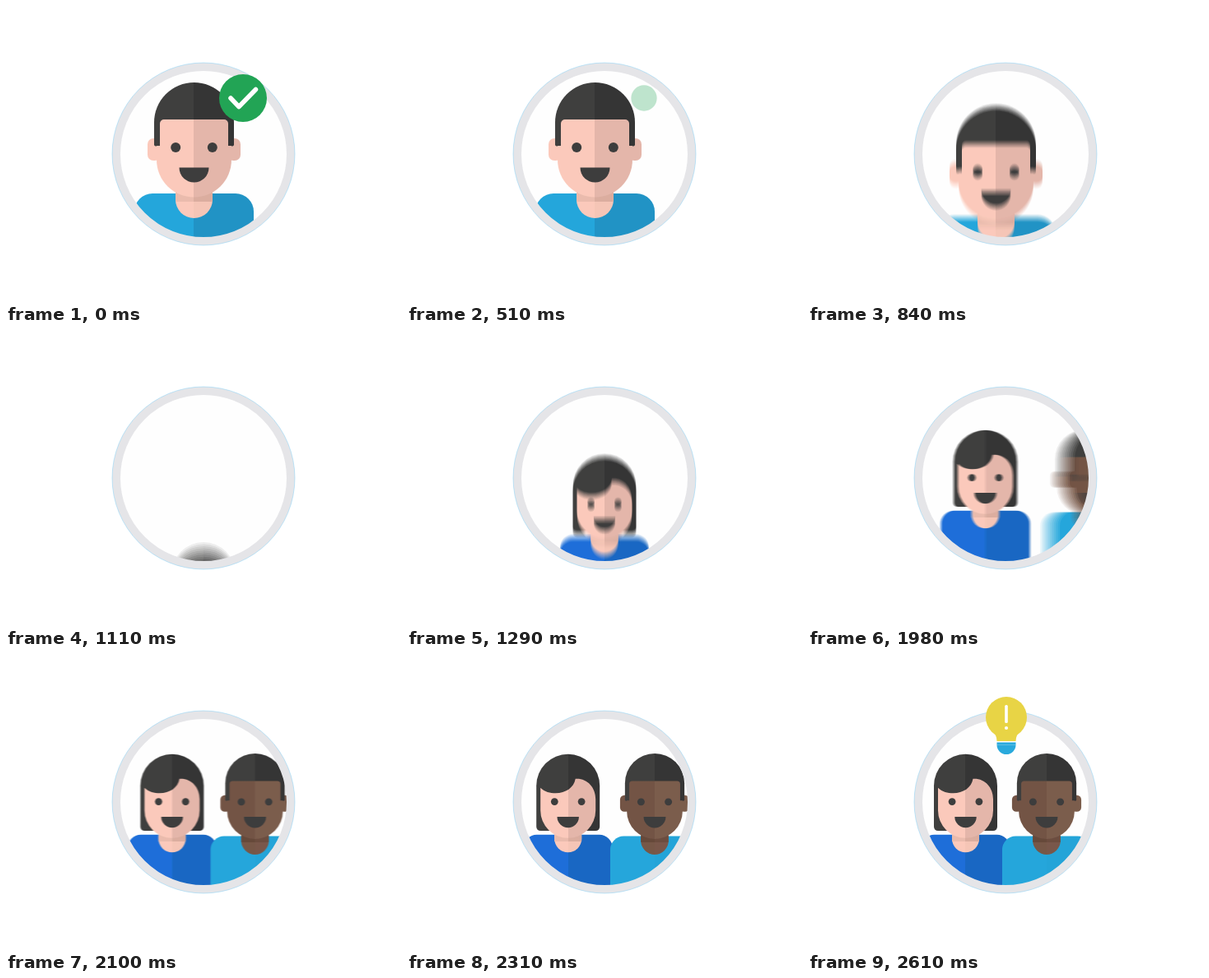
Animation of 480x360 px, one loop 5110 ms. Source, as an HTML page with a canvas:

```html
<!DOCTYPE html>
<html lang="en">
<head>
<meta charset="utf-8">
<title>Avatars</title>
<style>
  html, body { margin: 0; width: 100%; height: 100%; overflow: hidden; background: #fff; }
  canvas { display: block; width: 100vw; height: 100vh; }
</style>
</head>
<body>
<canvas id="stage" width="480" height="360"></canvas>
<script>
const W = 480, H = 360, LOOP = 5110, STEP = 30, REST = 2610;
const CX = 240, CY = 180, INNER = 101, OUTER = 111;
const SAMPLES = 12, SHUTTER = 30;
const DARK = '#404040';

const stage = document.getElementById('stage').getContext('2d');
const layer = document.createElement('canvas');
layer.width = W;
layer.height = H;
const c = layer.getContext('2d');

// Each colour pair is [left half, right half].
const HAIR = ['#434342', '#39393a'];
const PALE = {
  skin: ['#fbcbbd', '#e5b8ac'], neck: ['#fbcbbd', '#f6c6b8'], shade: ['#ebbdaf', '#dbafa2']
};
const BROWN = {
  skin: ['#765849', '#7f6050'], neck: ['#795a4b', '#7c5d4e'], shade: ['#694c3f', '#6f5245']
};
const MAN = { ...PALE, shirt: ['#29a9dc', '#2697c7'] };
const FRIEND = { ...BROWN, shirt: ['#2aa9dd', '#29a6d9'] };
const WOMAN = { ...PALE, shirt: ['#2374da', '#1f6ac3'] };

const span = (t, a, b) => Math.min(1, Math.max(0, (t - a) / (b - a)));
const mix = (a, b, p) => a + (b - a) * p;
const easeIn = u => u ** 3;
const easeOut = u => 1 - (1 - u) ** 3;
const easeInOut = (u, n) => u < .5 ? (2 * u) ** n / 2 : 1 - (2 - 2 * u) ** n / 2;
const backOut = (u, k) => 1 + (k + 1) * (u - 1) ** 3 + k * (u - 1) ** 2;

function duo([left, right]) {
  const g = c.createLinearGradient(-80, 0, 80, 0);
  g.addColorStop(0, left);
  g.addColorStop(.5, left);
  g.addColorStop(.5, right);
  g.addColorStop(1, right);
  return g;
}

function box(x, y, w, h, r, fill) {
  c.beginPath();
  c.roundRect(x, y, w, h, r);
  c.fillStyle = fill;
  c.fill();
}

function disc(g, x, y, r, fill, end = Math.PI * 2) {
  g.beginPath();
  g.arc(x, y, r, 0, end);
  g.fillStyle = fill;
  g.fill();
}

function at(g, x, y, scale, draw) {
  g.save();
  g.translate(x, y);
  g.scale(scale, scale);
  draw();
  g.restore();
}

function bust(look, half, top, radius, neck, neckEnd, shadeTop, shadeEnd) {
  box(-half, top, half * 2, 160, radius, duo(look.shirt));
  box(-neck, top, neck * 2, neckEnd - top, [0, 0, neck, neck], duo(look.neck));
  box(-neck, shadeTop, neck * 2, shadeEnd - shadeTop, 0, duo(look.shade));
}

function features(eyeX, eyeY, eyeR, mouthY, mouthR) {
  disc(c, -eyeX, eyeY, eyeR, DARK);
  disc(c, eyeX, eyeY, eyeR, DARK);
  disc(c, 0, mouthY, mouthR, DARK, Math.PI);
}

// The origin of each person is the top centre of the hair.
function man(look, x, y, scale) {
  at(c, x, y, scale, () => {
    const skin = duo(look.skin);
    bust(look, 72.5, 135, 22, 22.5, 165, 126, 145);
    box(-56.5, 68, 16, 27, 7, skin);
    box(40.5, 68, 16, 27, 7, skin);
    box(-48.5, 0, 97, 77.5, [48.5, 48.5, 2, 2], duo(HAIR));
    box(-45.5, 77, 91, 62.5, [0, 0, 45.5, 45.5], skin);
    box(-41.5, 45, 83, 36, [5, 5, 0, 0], skin);
    features(22.3, 79, 6, 103.5, 18);
  });
}

function woman(x, y) {
  at(c, x, y, 1, () => {
    box(-38.5, 0, 77, 93.3, [38.5, 38.5, 5, 5], duo(HAIR));
    bust(WOMAN, 54, 98, 16, 16.5, 119.5, 93, 106.3);
    c.beginPath();
    c.moveTo(-33.5, 41);
    c.bezierCurveTo(-28, 46, -22, 47.5, -15, 47.5);
    c.bezierCurveTo(-3, 47.5, 7, 41, 9, 30);
    c.bezierCurveTo(23, 29, 33.5, 40, 33.5, 55);
    c.lineTo(33.5, 68.5);
    c.arc(0, 68.5, 33.5, 0, Math.PI);
    c.closePath();
    c.fillStyle = duo(WOMAN.skin);
    c.fill();
    features(16.4, 57.8, 4.4, 76.2, 13.2);
  });
}

function people(t) {
  c.fillStyle = '#fefefe';
  c.fillRect(0, 0, W, H);
  const slide = easeInOut(span(t, 1680, 2250), 2);
  const arrive = easeInOut(span(t, 1700, 2190), 4);
  const join = easeInOut(span(t, 2310, 2580), 3);
  if (t < 1080) man(MAN, 228.5, 93 + 200 * easeIn(span(t, 570, 1080)), 1);
  if (t > 1080) {
    const rise = easeOut(span(t, 1080, 1530));
    const lift = easeInOut(span(t, 1620, 1950), 2);
    woman(mix(240, 195.7, slide) - 4.2 * join, mix(305, 127.3, rise) - 5.5 * lift);
  }
  if (t > 1700) man(FRIEND, mix(471, 301, arrive) - 11 * join, 121, .745);
}

function badge(t) {
  const u = span(t, 300, 572);
  const s = 1 - u ** 3;
  if (s <= 0) return;
  at(stage, 288, 112, s, () => {
    stage.globalAlpha = s * s;
    disc(stage, 0, 0, 29, '#22a455');
    stage.globalAlpha *= Math.max(0, 1 - 1.4 * u);
    stage.beginPath();
    stage.moveTo(-15, 0);
    stage.lineTo(-5, 10.5);
    stage.lineTo(15.5, -10.5);
    stage.strokeStyle = '#fff';
    stage.lineWidth = 5.5;
    stage.lineCap = stage.lineJoin = 'round';
    stage.stroke();
  });
}

function bulb(t) {
  const u = span(t, 2330, REST);
  if (u <= 0) return;
  at(stage, 241, 105, Math.max(0, backOut(u, 3)), () => {
    stage.globalAlpha = Math.min(1, 3 * u);
    disc(stage, 0, -28, 25, '#e8d445');
    stage.beginPath();
    stage.moveTo(-18, -12);
    stage.quadraticCurveTo(-11.5, -7, -11.5, 1);
    stage.lineTo(11.5, 1);
    stage.quadraticCurveTo(11.5, -7, 18, -12);
    stage.fill();
    stage.fillStyle = '#fff';
    stage.fillRect(-11.5, 1, 23, 1.5);
    stage.fillStyle = '#29a9dc';
    stage.fillRect(-11.5, 2.5, 23, 3);
    disc(stage, 0, 5.5, 11.5, '#29a9dc', Math.PI);
    stage.beginPath();
    stage.roundRect(-1.8, -43, 3.6, 22, 1.5);
    stage.fillStyle = '#fff';
    stage.fill();
    disc(stage, 0, -15, 2.1, '#fff');
  });
}

function ring(r, width, color) {
  stage.beginPath();
  stage.arc(CX, CY, r, 0, Math.PI * 2);
  stage.lineWidth = width;
  stage.strokeStyle = color;
  stage.stroke();
}

function render(t) {
  stage.fillStyle = '#fff';
  stage.fillRect(0, 0, W, H);
  stage.save();
  stage.beginPath();
  stage.arc(CX, CY, INNER + 1, 0, Math.PI * 2);
  stage.clip();
  // Average several instants for motion blur.
  for (let i = 0; i < SAMPLES; i++) {
    people(t + SHUTTER * ((i + .5) / SAMPLES - .5));
    stage.globalAlpha = 1 / (i + 1);
    stage.drawImage(layer, 0, 0);
  }
  stage.restore();
  ring((INNER + OUTER) / 2, OUTER - INNER, '#e5e5e8');
  ring(OUTER, 1, 'rgba(120, 205, 245, .45)');
  badge(t);
  bulb(t);
}

let shown = -1;
function tick() {
  const t = Math.min(REST, Math.floor(performance.now() % LOOP / STEP) * STEP);
  if (t !== shown) render(shown = t);
  requestAnimationFrame(tick);
}
tick();
</script>
</body>
</html>
```
